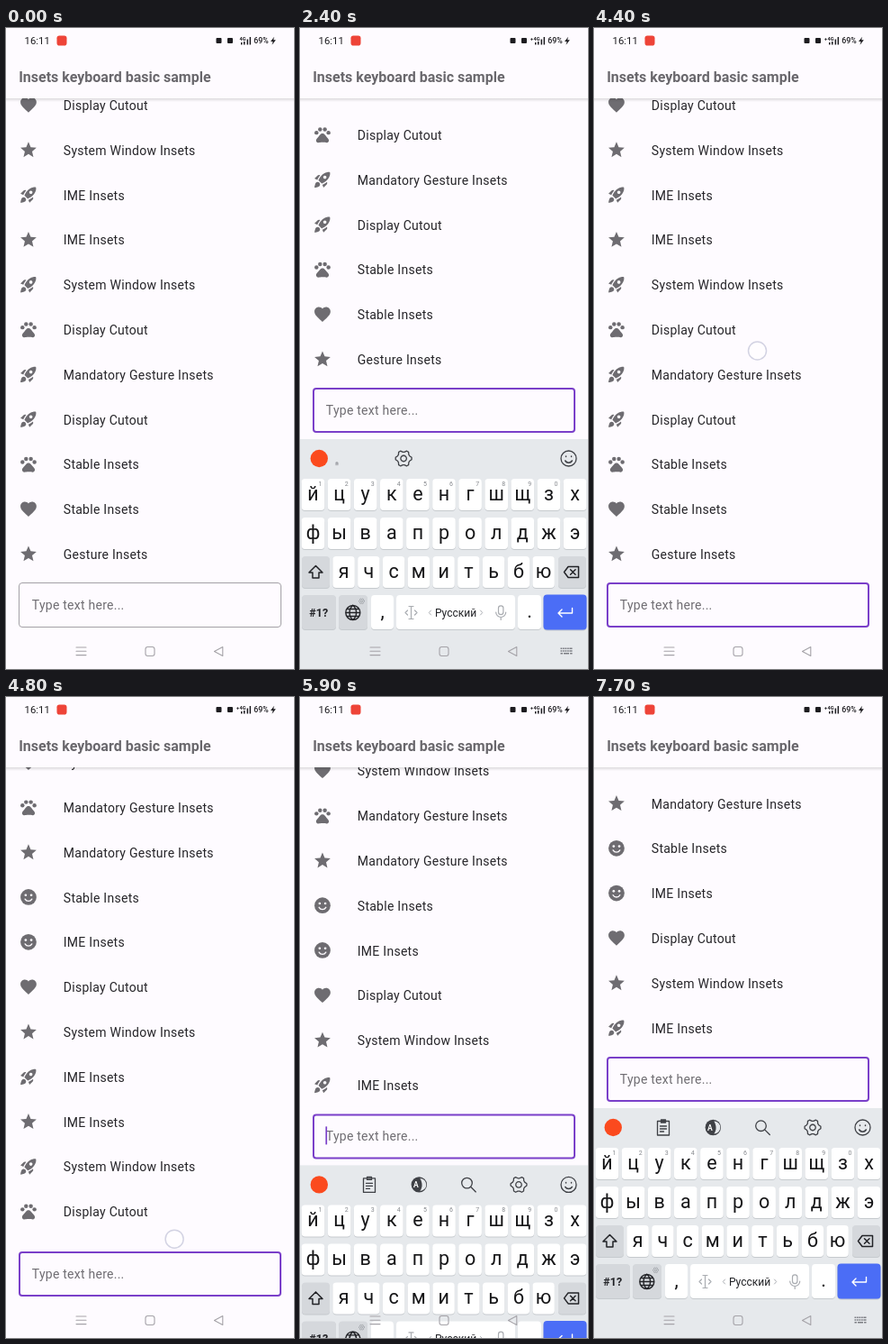
Animation of 320 by 711 pixels, one loop 8000 ms. Source, as an HTML page:

```html
<!DOCTYPE html>
<html lang="en">
<head>
<meta charset="utf-8">
<title>Insets keyboard basic sample</title>
<style>
  html, body { margin: 0; width: 100%; height: 100%; overflow: hidden; background: #fefbff; }
  svg { display: block; width: 100%; height: 100%; }
  text { font-family: Roboto, "Noto Sans", sans-serif; white-space: pre; }
  .item { font-size: 14px; letter-spacing: .27px; fill: #262529; }
  .hint { font-size: 14px; letter-spacing: .25px; fill: #6f6d72; }
  .key { font-size: 21.5px; text-anchor: middle; fill: #161618; }
  .digit { font-size: 7px; text-anchor: middle; fill: #85888d; }
  .line { fill: none; stroke-linecap: round; stroke-linejoin: round; }
</style>
</head>
<body>
<svg id="stage" viewBox="0 0 320 711" xmlns="http://www.w3.org/2000/svg">
  <defs>
    <linearGradient id="shade" x1="0" y1="0" x2="0" y2="1">
      <stop offset="0" stop-color="#000" stop-opacity=".13"/>
      <stop offset="1" stop-color="#000" stop-opacity="0"/>
    </linearGradient>
    <g id="heart"><path d="M12 21.35l-1.45-1.32C5.4 15.36 2 12.28 2 8.5 2 5.42 4.42 3 7.5 3c1.74 0 3.41.81 4.5 2.09C13.09 3.81 14.76 3 16.5 3 19.58 3 22 5.42 22 8.5c0 3.78-3.4 6.86-8.55 11.54z"/></g>
    <g id="star"><path d="M12 17.27L18.18 21l-1.64-7.03L22 9.24l-7.19-.61L12 2 9.19 8.63 2 9.24l5.46 4.73L5.82 21z"/></g>
    <g id="paw">
      <circle cx="4.5" cy="9.5" r="2.5"/><circle cx="9" cy="5.5" r="2.5"/>
      <circle cx="15" cy="5.5" r="2.5"/><circle cx="19.5" cy="9.5" r="2.5"/>
      <path d="M17.34 14.86c-.87-1.02-1.6-1.89-2.48-2.91-.8-.93-1.6-1.45-2.86-1.45s-2.06.52-2.86 1.45c-.88 1.02-1.61 1.89-2.48 2.91-1.31 1.31-2.92 2.76-2.62 4.79.29 1.02 1.02 2.03 2.33 2.32.73.15 3.06-.44 5.63-.44s4.9.58 5.63.44c1.31-.29 2.04-1.31 2.33-2.32.31-2.04-1.31-3.48-2.62-4.79z"/>
    </g>
    <g id="rocket"><path d="M9.19 6.35c-2.04 2.29-3.44 5.58-3.57 5.89L2 10.69l4.05-4.05c.47-.47 1.15-.68 1.81-.55zM11.17 17s3.74-1.55 5.89-3.7c5.4-5.4 4.5-9.62 4.21-10.57-.95-.3-5.17-1.19-10.57 4.21C8.55 9.09 7 12.83 7 12.83zm6.48-2.19c-2.29 2.04-5.58 3.44-5.89 3.57L13.31 22l4.05-4.05c.47-.47.68-1.15.55-1.81zM9 18c0 .83-.34 1.58-.88 2.12C6.94 21.3 2 22 2 22s.7-4.94 1.88-6.12C4.42 15.34 5.17 15 6 15c1.66 0 3 1.34 3 3zm4-9c0-1.1.9-2 2-2s2 .9 2 2-.9 2-2 2-2-.9-2-2z"/></g>
    <g id="smile">
      <circle cx="12" cy="12" r="10"/>
      <g fill="#fefbff"><circle cx="8.5" cy="9.5" r="1.5"/><circle cx="15.5" cy="9.5" r="1.5"/></g>
      <path class="line" d="M7.7 14.4a4.9 4.9 0 0 0 8.6 0" stroke="#fefbff" stroke-width="1.5"/>
    </g>
  </defs>

  <rect width="320" height="711" fill="#fefbff"/>
  <g id="list" fill="#6e6c71"></g>

  <g id="field">
    <rect y="607" width="320" height="330" fill="#fefbff"/>
    <rect id="idle" x="14.5" y="615.5" width="291" height="49" rx="3.5" fill="none" stroke="#a3a1a6"/>
    <rect id="focus" x="15" y="616" width="290" height="48" rx="3" fill="none" stroke="#7a3fc9" stroke-width="2"/>
    <text class="hint" x="28.8" y="644.7">Type text here...</text>
    <rect id="cursor" x="28.4" y="629" width="1.7" height="20" fill="#7a3fc9"/>
  </g>

  <rect width="320" height="78" fill="#fefbff"/>
  <rect y="78" width="320" height="4" fill="url(#shade)"/>
  <text x="14.2" y="60" font-size="16" font-weight="700" fill="#69676c">Insets keyboard basic sample</text>

  <g fill="#1d1c20">
    <text x="20.6" y="18.3" font-size="11.3">16:11</text>
    <rect x="56.5" y="8.5" width="11" height="11" rx="2.8" fill="#ee4438"/>
    <rect x="233.5" y="11" width="6" height="6" rx="1"/>
    <rect x="246" y="11" width="6" height="6" rx="1"/>
    <text id="plus" x="256" y="13.5" font-size="5.5" font-weight="700">+</text>
    <text x="259.5" y="14" font-size="5.5" font-weight="700">4G</text>
    <path d="M261 16h1.5v2.5H261zM264 15h1.5v3.5H264zM267.6 12.5h1.5v6h-1.5zM270.6 10h1.5v8.5h-1.5z"/>
    <text x="275.3" y="17.4" font-size="8.8" font-weight="500">69%</text>
    <path d="M298 9.8l-4 5.2h2.5l-.9 3.8 4.2-5.5h-2.6z"/>
  </g>

  <g id="board"></g>

  <g class="line" stroke="#a5a3a8" stroke-width="1.1">
    <path d="M78 687h11M78 691.3h11M78 695.6h11"/>
    <rect x="155" y="686.5" width="10" height="10" rx="2.4"/>
    <path d="M231.5 691.5l9.3-5v10z"/>
  </g>
  <g id="switcher" fill="#7b7d82">
    <path d="M289.5 687.5h13v1.6h-13zM289.5 690.2h13v1.6h-13zM289.5 692.9h2.4v1.7h-2.4zM293 692.9h6v1.7h-6zM300.1 692.9h2.4v1.7h-2.4z"/>
    <path d="M291.6 687v5M294.1 687v5M296.6 687v5M299.1 687v5" stroke="#e6e9ec" stroke-width=".7"/>
  </g>
  <circle id="ring" r="10" fill="#fff" fill-opacity=".55" stroke="#d3d3e3" stroke-width="1.5"/>
</svg>

<script>
const LOOP = 8000, ROW = 49.8, LAST = 584, BOARD = 255, LIFT = 216, SCROLL = 398;
const $ = id => document.getElementById(id);

function add(parent, tag, attrs, text) {
  const el = document.createElementNS('http://www.w3.org/2000/svg', tag);
  for (const k in attrs) el.setAttribute(k, attrs[k]);
  if (text) el.textContent = text;
  parent.appendChild(el);
  return el;
}

// List rows: icon and label, top to bottom
const LABELS = { S: 'System Window', G: 'Gesture', I: 'IME', M: 'Mandatory Gesture', T: 'Stable', D: 'Display Cutout' };
const ROWS = ('heart S,heart G,heart I,heart S,paw M,star M,smile T,smile I,heart D,star S,rocket I,' +
  'star I,rocket S,paw D,rocket M,rocket D,paw T,heart T,star G').split(',');
ROWS.forEach((row, i) => {
  const [icon, code] = row.split(' ');
  const y = LAST - ROW * (ROWS.length - 1 - i);
  add($('list'), 'use', { href: '#' + icon, transform: `translate(14.3 ${y - 11.3}) scale(.889)` });
  add($('list'), 'text', { class: 'item', x: 63.8, y: y + 5 }, LABELS[code] + (code === 'D' ? '' : ' Insets'));
});

// Keyboard
const board = $('board'), INK = '#3f4146', DARK = '#222327', PALE = '#a9acb1', GRAY = '#d5d8dc';
add(board, 'rect', { y: 456, width: 320, height: 255, fill: '#e6e9ec' });

function key(x, y, w, h, fill = '#fff') {
  add(board, 'rect', { x, y: y + 1, width: w, height: h, rx: 4, fill: '#c6cace' });
  add(board, 'rect', { x, y, width: w, height: h, rx: 4, fill });
}
function letters(chars, x0, pitch, y, w, digits = '') {
  [...chars].forEach((c, i) => {
    const x = x0 + i * pitch;
    key(x - w / 2, y - 17.5, w, 35);
    add(board, 'text', { class: 'key', x, y: y + 6.5 }, c);
    if (digits[i]) add(board, 'text', { class: 'digit', x: x + 8, y: y - 9.5 }, digits[i]);
  });
}
function line(parent, d, stroke = INK, width = 1.3) {
  return add(parent, 'path', { class: 'line', d, stroke, 'stroke-width': width });
}
function gear(parent, r, stroke, width) {
  const pts = Array.from({ length: 24 }, (_, i) => {
    const a = (i - .5) * Math.PI / 12, q = i % 4 < 2 ? r : r * .8;
    return (q * Math.cos(a)).toFixed(2) + ' ' + (q * Math.sin(a)).toFixed(2);
  });
  line(parent, 'M' + pts.join('L') + 'z', stroke, width);
  add(parent, 'circle', { r: r * .36, fill: 'none', stroke, 'stroke-width': width });
}

letters('йцукенгшщзх', 14.5, 29.1, 517.5, 25.6, '1234567890');
letters('фывапролджэ', 14.5, 29.1, 560.5, 25.6);
letters('ячсмитьбю', 48.6, 27.75, 603.5, 24.4);
key(2, 586, 31, 35, GRAY);
key(287, 586, 31, 35, GRAY);
line(board, 'M17.5 596.5l7.5 7.5h-4v6h-7v-6h-4z', DARK, 1.5);
line(board, 'M293.5 603.5l4.5-6h11.5v12h-11.5zM300.5 600.8l5.5 5.5M306 600.8l-5.5 5.5', DARK, 1.5);
key(2, 629, 38, 38, GRAY);
key(43, 629, 32, 38, GRAY);
key(79, 629, 25, 38);
key(107, 629, 132, 38);
key(242, 629, 26, 38);
key(270.5, 628.5, 48, 39, '#4b6df6');
add(board, 'text', { x: 20.8, y: 653, 'font-size': 12.5, 'font-weight': 700, 'text-anchor': 'middle', fill: DARK }, '#1?');
add(board, 'text', { class: 'key', x: 91.5, y: 654 }, ',');
add(board, 'text', { class: 'key', x: 255, y: 654 }, '.');
add(board, 'text', { x: 173, y: 652.5, 'font-size': 12, 'text-anchor': 'middle', fill: DARK }, 'Русский');
line(board, 'M50.8 648.5a8 8 0 1 0 16 0a8 8 0 1 0-16 0h16M58.8 640.5c-5 4-5 12 0 16c5-4 5-12 0-16M52 644.5h13.6M52 652.5h13.6', DARK, 1.4);
gear(add(board, 'g', { transform: 'translate(68.5 635.8)' }), 3, '#9a9da2', .8);
line(board, 'M145.5 646l-2.2 2.5 2.2 2.5M200.5 646l2.2 2.5-2.2 2.5', PALE, 1);
line(board, 'M121 641.5h5M123.5 641.5v14M121 655.5h5M119.5 646l-2.5 2.5 2.5 2.5M127.5 646l2.5 2.5-2.5 2.5', PALE, 1.2);
line(board, 'M220.5 643.5a2.7 2.7 0 0 1 5.4 0v4.5a2.7 2.7 0 0 1-5.4 0zM217.7 648a5.5 5.5 0 0 0 11 0M223.2 653.5v3', PALE, 1.2);
line(board, 'M302.5 643.5v5.5h-15M291 645l-4 4 4 4', '#fff', 1.4);

// Toolbar
add(board, 'circle', { cx: 21.3, cy: 477.5, r: 9.7, fill: '#fb4a1e' });
add(board, 'circle', { cx: 298.5, cy: 477.5, r: 8.5, fill: 'none', stroke: INK, 'stroke-width': 1.3 });
line(board, 'M294.7 480a4.4 4.4 0 0 0 7.6 0M295.5 475v.5M301.5 475v.5', INK, 1.5);
const tools = [77, 132.3, 187.3, 243].map((x, i) => ({ x, i, el: add(board, 'g', {}) }));
line(tools[0].el, 'M-6.5-7h13v15.5h-13zM-2.5-8.5h5v3h-5zM-3.5-1.5h7M-3.5 1.5h7M-3.5 4.5h4');
add(tools[1].el, 'circle', { r: 8.7, fill: INK });
add(tools[1].el, 'path', { d: 'M1-7a7 7 0 0 1 0 14c3-4 3-9 0-14z', fill: '#e6e9ec' });
add(tools[1].el, 'text', { x: -6.2, y: 3, 'font-size': 8.5, 'font-weight': 700, fill: '#fff' }, 'A');
line(tools[2].el, 'M4-1.8a5.8 5.8 0 1 1-11.6 0a5.8 5.8 0 1 1 11.6 0M2.6 2.6l5.4 5.4');
gear(tools[3].el, 9, INK, 1.3);

// Timeline
const span = (t, a, b) => Math.min(1, Math.max(0, (t - a) / (b - a)));
const within = (t, a, b) => t >= a && t < b;
const out = (u, k) => 1 - Math.pow(1 - u, k);
const mix = (a, b, u) => a + (b - a) * u;
const show = (id, on) => $(id).setAttribute('visibility', on ? 'visible' : 'hidden');
const move = (el, x, y, s = 1) => el.setAttribute('transform', `translate(${x} ${y}) scale(${s})`);

const DRAG = [4410, 4850];

function boardPos(t) {
  if (t < 3600) return out(span(t, 2060, 2380), 2.2);
  if (t < 5500) return 1 - out(span(t, 3680, 4030), 2);
  return out(span(t, 5750, 6070), 2.2);
}
function drag(t) { return Math.pow(span(t, ...DRAG), 1.2); }
function scrollPos(t) {
  const held = 273;
  return t < DRAG[1] ? held * drag(t) : mix(held, SCROLL, out(span(t, DRAG[1], 5450), 2.59));
}
function ringPos(t) {
  if (within(t, 1460, 1740)) return [236.5, 650];
  if (within(t, 4380, 4890)) return [mix(181.5, 188, drag(t)), mix(358, 639, drag(t))];
  if (within(t, 5580, 5720)) return [236.5, 645];
  return null;
}

function draw(t) {
  const p = boardPos(t), rise = Math.max(0, BOARD * p - (BOARD - LIFT));
  move($('list'), 0, scrollPos(t) - rise);
  move($('field'), 0, -rise);
  move(board, 0, BOARD * (1 - p));
  show('board', p > 0);
  show('switcher', within(t, 2360, 3640) || t >= 6250);
  show('plus', t >= 200);
  show('cursor', within(t, 5700, 6650) || within(t, 7150, 7650));
  show('idle', t < 1750);
  show('focus', t >= 1750);

  // Tools spread out from the left; all but the gear also grow
  const q = out(span(t, 2300, 2800), 2);
  for (const { x, i, el } of tools) {
    const s = i === 3 ? 1 : span(q, i ? .45 : .22, 1);
    move(el, mix(21, x, i === 3 ? mix(.1, 1, q) : q), 477.5 + 7 * (1 - s), s);
  }

  const ring = ringPos(t);
  show('ring', ring);
  if (ring) move($('ring'), ...ring);
}

let start;
function tick(now) {
  start ??= now;
  draw((now - start) % LOOP);
  requestAnimationFrame(tick);
}
draw(0);
requestAnimationFrame(tick);
</script>
</body>
</html>
```
